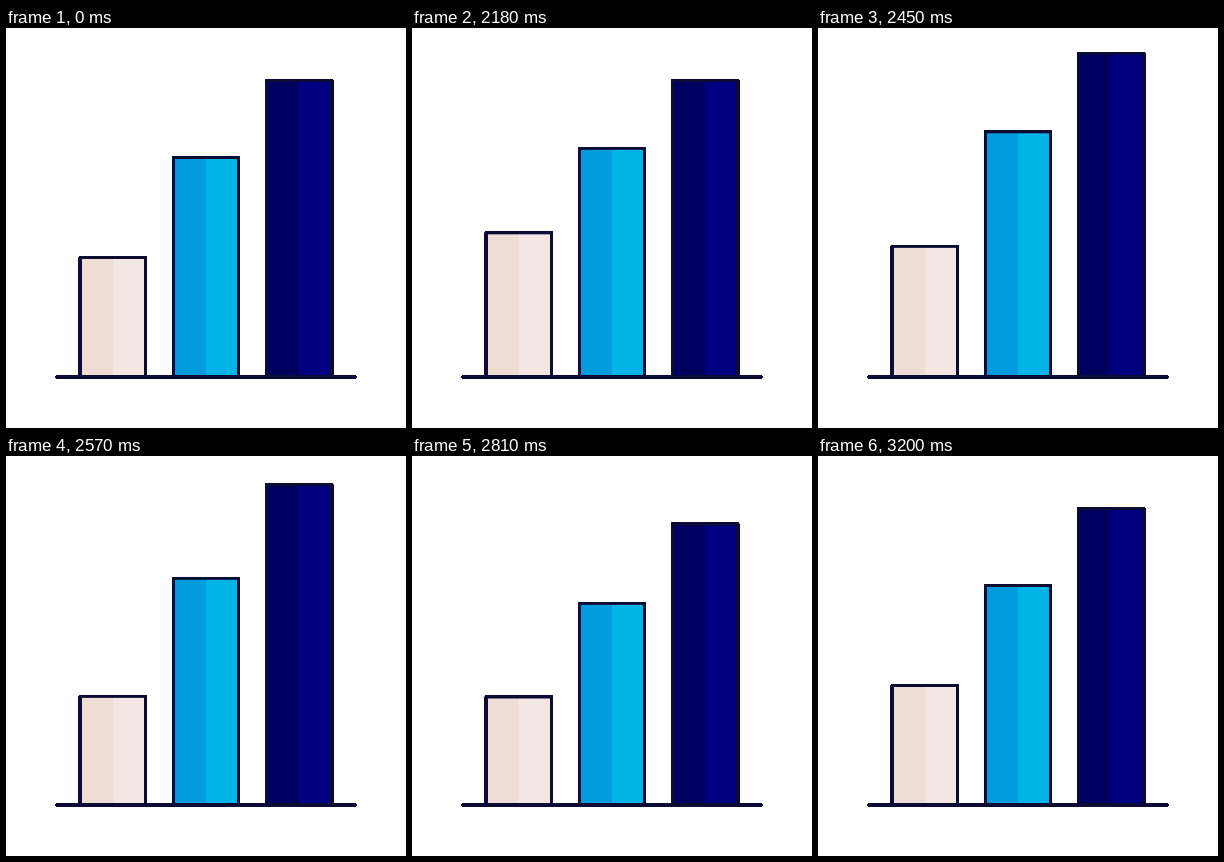
An HTML page for the animation above (3.23 s loop, 400x400 px).

```html
<!DOCTYPE html>
<html lang="en">
<head>
<meta charset="utf-8">
<title>Bar chart</title>
<style>
  html, body {
    margin: 0;
    width: 100%;
    height: 100%;
    overflow: hidden;
    background: #fff;
  }
  svg {
    display: block;
    width: 100%;
    height: 100%;
    shape-rendering: crispEdges;
  }
  .ink {
    fill: none;
    stroke: #0b0b33;
    stroke-width: 3.4;
    stroke-linecap: round;
    stroke-linejoin: round;
  }
  .bar {
    animation: bounce 3230ms linear infinite;
  }
  .bar:nth-child(2) { animation-delay: 100ms; }
  .bar:nth-child(3) { animation-delay: 200ms; }

  @keyframes bounce {
    0% { transform: translateY(0); }
    61.92% {
      transform: translateY(0);
      animation-timing-function: cubic-bezier(.38, 0, .17, 1);
    }
    71.21% {
      transform: translateY(-27.8px);
      animation-timing-function: cubic-bezier(.37, 0, .6, 1);
    }
    82.82% {
      transform: translateY(18.3px);
      animation-timing-function: cubic-bezier(.42, 0, .6, 1);
    }
    92.57%, 100% { transform: translateY(0); }
  }
</style>
</head>
<body>
<svg viewBox="0 0 400 400">
  <clipPath id="ground"><rect width="400" height="349"/></clipPath>
  <!-- Bars run on below the baseline, where the clip hides them -->
  <g clip-path="url(#ground)">
    <g class="bar">
      <path fill="#eeddd5" d="M73.9 229.7h65.4v200h-65.4z"/>
      <path fill="#f3e6e3" d="M106.6 229.7h32.7v200h-32.7z"/>
      <path class="ink" d="M73.9 429.7v-200h65.4v200"/>
    </g>
    <g class="bar">
      <path fill="#009cde" d="M167.3 129.7h65.4v300h-65.4z"/>
      <path fill="#00b4e8" d="M200 129.7h32.7v300h-32.7z"/>
      <path class="ink" d="M167.3 429.7v-300h65.4v300"/>
    </g>
    <g class="bar">
      <path fill="#000060" d="M260.7 52.7h65.4v377h-65.4z"/>
      <path fill="#000080" d="M293.4 52.7h32.7v377h-32.7z"/>
      <path class="ink" d="M260.7 429.7v-377h65.4v377"/>
    </g>
  </g>
  <path class="ink" d="M50.7 349h298.6"/>
</svg>
</body>
</html>
```
